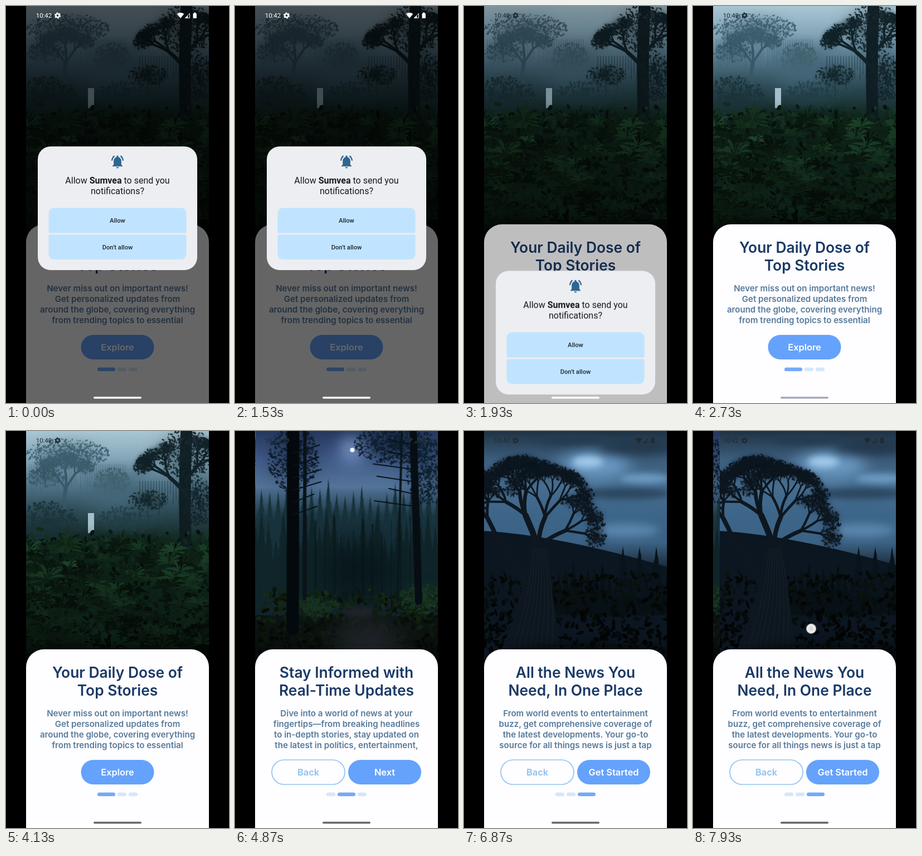
An HTML page with a canvas that plays this animation: 400 px wide and 711 px high, repeating every 8000 ms.

```html
<!DOCTYPE html>
<html lang="en">
<head>
<meta charset="utf-8">
<title>Onboarding</title>
<style>
  html, body { margin: 0; width: 100%; height: 100%; overflow: hidden; background: #000; }
  #stage { position: relative; width: 400px; height: 711px; overflow: hidden; }
  #view { position: absolute; left: 36px; top: 0; width: 328px; height: 430px; overflow: hidden; }
  #rail { display: flex; width: 984px; }
  svg { position: absolute; left: 0; top: 0; }
  text { text-anchor: middle; }
  .title { font: 600 26.4px Inter, sans-serif; fill: #1a3a66; }
  .body { font: 600 15.1px Inter, sans-serif; fill: #557a9c; }
  .label { font: 600 16.4px Inter, sans-serif; fill: #fff; }
  .ask { font: 400 16px Roboto, sans-serif; fill: #16191d; }
  .ask tspan { font-weight: 700; }
  .option { font: 500 11.2px Roboto, sans-serif; fill: #1d2630; }
  .clock { font: 400 11.4px Roboto, sans-serif; }
</style>
</head>
<body>
<div id="stage">
  <div id="view"><div id="rail"></div></div>
  <svg width="400" height="711">
    <defs>
      <radialGradient id="tip">
        <stop offset="0" stop-color="#d4d4d4"/>
        <stop offset=".8" stop-color="#f2f2f2"/>
        <stop offset="1" stop-color="#8a8a8a" stop-opacity=".5"/>
      </radialGradient>
      <clipPath id="options"><rect x="76.500" y="361.500" width="247" height="92.500" rx="9.500"/></clipPath>
    </defs>

    <path d="M36 711V423A32 32 0 0 1 68 391H332A32 32 0 0 1 364 423V711Z" fill="#fefdff"/>
    <g id="pages"></g>
    <rect id="dim" x="36" width="328" height="711"/>

    <g id="status">
      <text class="clock" x="68" y="21">10:42</text>
      <g fill="none" stroke="currentColor">
        <circle cx="92.500" cy="17" r="3.100" stroke-width="2.400"/>
        <circle cx="92.500" cy="17" r="4.700" stroke-width="1.800" stroke-dasharray="2.600 2.320"/>
        <path d="M321.500 21.400L329.400 13.400V21.400Z"/>
      </g>
      <path d="M313 22L306.600 14.200A10.200 10.200 0 0 1 319.400 14.200ZM321 22L326 17V22Z"/>
      <rect x="335.500" y="13" width="6.400" height="9" rx="1"/>
      <rect x="337.200" y="11.600" width="3" height="2"/>
    </g>

    <g id="dialog">
      <rect x="57" y="251.500" width="286" height="221.500" rx="23" fill="#edeef1"/>
      <g transform="translate(200 279)" fill="#2e6690">
        <path d="M-6.800 5V-2A6.800 6.800 0 0 1 6.800 -2V5L9 7.200V8.300H-9V7.200Z"/>
        <circle cy="-9.500" r="1.700"/>
        <path d="M-2.200 9.400H2.200A2.200 2.200 0 0 1 -2.200 9.400Z"/>
        <path d="M-10 -2Q-9.500 -7.500 -5.500 -10.500M10 -2Q9.500 -7.500 5.500 -10.500" fill="none" stroke="#2e6690" stroke-width="2.200"/>
      </g>
      <text class="ask" x="200" y="318">Allow <tspan>Sumvea</tspan> to send you</text>
      <text class="ask" x="200" y="336.500">notifications?</text>
      <g clip-path="url(#options)" fill="#c0e4ff">
        <rect x="76" y="361" width="248" height="45.500" rx="2.500"/>
        <rect x="76" y="409.500" width="248" height="45" rx="2.500"/>
      </g>
      <text class="option" x="200" y="388">Allow</text>
      <text class="option" x="200" y="436">Don’t allow</text>
    </g>

    <rect id="handle" x="157" y="699.800" width="86" height="3.400" rx="1.700"/>
    <circle id="touch" r="9.500" fill="url(#tip)"/>
  </svg>
</div>

<script>
const LOOP = 8000, FPS = 15, WIDTH = 328;
const $ = id => document.getElementById(id);

// ---- Onboarding pages ----
const pages = [
  { title: ['Your Daily Dose of', 'Top Stories'],
    body: ['Never miss out on important news!', 'Get personalized updates from',
      'around the globe, covering everything', 'from trending topics to essential'],
    next: 'Explore' },
  { title: ['Stay Informed with', 'Real-Time Updates'],
    body: ['Dive into a world of news at your', 'fingertips—from breaking headlines',
      'to in-depth stories, stay updated on', 'the latest in politics, entertainment,'],
    next: 'Next' },
  { title: ['All the News You', 'Need, In One Place'],
    body: ['From world events to entertainment', 'buzz, get comprehensive coverage of',
      'the latest developments. Your go-to', 'source for all things news is just a tap'],
    next: 'Get Started' }
];

const lines = (cls, rows, y, step) => rows.map((row, i) =>
  `<text class="${cls}" x="200" y="${y + i * step}">${row}</text>`).join('');

const button = (cx, label, hollow) =>
  `<rect x="${cx - 65.5}" y="589" width="131" height="44" rx="22" ${hollow
    ? 'fill="none" stroke="#90c3f3" stroke-width="1.7"' : 'fill="#64a2fc"'}/>
   <text class="label" x="${cx}" y="616.8" ${hollow ? 'style="fill:#8fc1ef"' : ''}>${label}</text>`;

const dots = active => pages.map((_, i) =>
  `<rect x="${164 + i * 20 + (i > active ? 16 : 0)}" y="647.5" width="${i === active ? 32 : 16}"
    height="6.4" rx="3.2" fill="${i === active ? '#72aafb' : '#d5e7f7'}"/>`).join('');

$('pages').innerHTML = pages.map((p, i) => `<g id="page${i}">
  ${lines('title', p.title, 442, 32)}${lines('body', p.body, 510.5, 19.1)}
  ${i ? button(131.5, 'Back', true) + button(268.5, p.next) : button(200, p.next)}
  ${dots(i)}</g>`).join('');

// ---- Scenery ----
let seed = 7, ctx;
const rnd = (lo = 0, hi = 1) =>
  lo + (hi - lo) * (seed = (seed * 16807) % 2147483647) / 2147483647;

// Vertical gradient with one colour every 50 px.
function wash(...colors) {
  const g = ctx.createLinearGradient(0, 0, 0, 400);
  colors.forEach((color, i) => g.addColorStop(i / (colors.length - 1), color));
  ctx.fillStyle = g;
  ctx.fillRect(-50, 0, 500, 430);
}

function oval(color, x, y, rx, ry, turn = 0) {
  ctx.fillStyle = color;
  ctx.beginPath();
  ctx.ellipse(x, y, rx, ry, turn, 0, 7);
  ctx.fill();
}

function glow(color, x, y, rx, ry, blur = ry * .6) {
  ctx.filter = `blur(${blur}px)`;
  oval(color, x, y, rx, ry);
  ctx.filter = 'none';
}

function limb(color, w, x1, y1, x2, y2, bend = 0) {
  ctx.strokeStyle = color;
  ctx.lineWidth = w;
  ctx.lineCap = 'round';
  ctx.beginPath();
  ctx.moveTo(x1, y1);
  ctx.quadraticCurveTo((x1 + x2) / 2 + bend, (y1 + y2) / 2, x2, y2);
  ctx.stroke();
}

// Soft crown with fine leaves, denser towards its middle.
function crown(color, x, y, rx, ry) {
  glow(color + '90', x, y, rx * .75, ry * .7);
  for (let i = 0; i < rx * ry / 5; i++) {
    const a = rnd(0, 6.28), d = rnd() ** .65, s = rnd(1.5, 3.5);
    oval(color + 'd0', x + Math.cos(a) * rx * d, y + Math.sin(a) * ry * d, s, s * .5, rnd(0, 3));
  }
}

function tree(color, x, y, angle, len, width, depth) {
  const ex = x + Math.cos(angle) * len, ey = y + Math.sin(angle) * len;
  limb(color, width, x, y, ex, ey, rnd(-.15, .15) * len);
  if (!depth) return crown(color, ex, ey, len * .7, len * .5);
  for (const turn of [-.5, 0, .5])
    tree(color, ex, ey, angle + turn + rnd(-.2, .2), len * .74, width * .6, depth - 1);
}

function pine(color, x, top, base, half) {
  ctx.fillStyle = color;
  for (const side of [-1, 1]) {
    ctx.beginPath();
    ctx.moveTo(x, top);
    for (let y = top + 4; y < base; y += 6) {
      const w = side * half * (y - top) / (base - top);
      ctx.lineTo(x + w * rnd(.8, 1.3), y + 4);
      ctx.lineTo(x + w * .6, y);
    }
    ctx.lineTo(x, base);
    ctx.fill();
  }
}

// Scattered dabs that darken towards the bottom.
function scrub(n, hue, sat, light, top, draw) {
  for (let i = 0; i < n; i++) {
    const y = top + (400 - top) * i / n, l = light * rnd(.25, 1) * (1.1 - .7 * i / n);
    draw(`hsl(${hue} ${sat}% ${l}%)`, rnd(0, 370), y + rnd(-8, 8));
  }
}
const dab = (color, x, y) => oval(color, x, y, rnd(3, 8), rnd(1.5, 4), rnd(0, 3));

// Fan of narrow arching blades.
function fern(color, x, y) {
  const len = rnd(14, 38), n = 8;
  for (let i = 0; i <= n; i++) {
    const a = -Math.PI * (i / n + rnd(-.04, .04)), l = len * rnd(.6, 1.1);
    const dx = Math.cos(a) * l, dy = Math.sin(a) * l * .75;
    ctx.fillStyle = color;
    ctx.beginPath();
    ctx.moveTo(x, y);
    ctx.quadraticCurveTo(x + dx * .5 + 2, y + dy - 3, x + dx, y + dy + Math.abs(dx) * .2);
    ctx.quadraticCurveTo(x + dx * .5 - 2, y + dy * .6 + 2, x, y);
    ctx.fill();
  }
}

function jungle() {
  wash('#a9c6d4', '#86a8ba', '#507386', '#2a4751', '#10261f', '#0b1d16', '#08160f', '#06100b', '#030706');
  glow('#45687a', 205, 115, 50, 35);
  crown('#42636f', 190, 92, 34, 26);
  tree('#3a5a69', 107, 145, -1.57, 42, 7, 2);
  crown('#3f606f', 110, 42, 76, 28);
  crown('#385765', 70, 82, 36, 18);
  for (let x = 42; x < 215; x += 4) limb('#3a5a6970', 1, x, 60, x, rnd(75, 115));
  crown('#1b343a', 75, 165, 55, 40);
  crown('#223e47', 215, 160, 50, 26);
  ctx.fillStyle = '#a3bfcc';
  ctx.fillRect(147, 147, 11, 36);
  limb('#0f1d22', 21, 324, -5, 322, 200, -4);
  tree('#12232a', 322, 115, -2.3, 42, 7, 2);
  tree('#12232a', 322, 90, -.9, 35, 6, 2);
  crown('#12242a', 322, 40, 50, 45);
  crown('#14272c', 255, 124, 36, 18);
  crown('#12242a', 345, 125, 28, 45);
  for (let x = 240; x < 364; x += 5) limb('#12242aa0', 1, x, 90, x, rnd(110, 165));
  glow('#0c2118', 200, 290, 210, 100, 12);
  scrub(900, 145, 38, 14, 182, dab);
  scrub(190, 140, 40, 19, 205, fern);
  glow('#030706', 200, 405, 200, 14);
}

function forest() {
  ctx.translate(42, 0);
  wash('#26395f', '#425c8a', '#54749a', '#1e3b46', '#12292e', '#0c1e21', '#0a1719', '#0c1412', '#080c0c');
  glow('#7590be', 168, 34, 22, 22);
  oval('#f5f8ff', 168, 34, 4, 4);
  for (let x = -10; x < 345; x += 15) pine('#18323c', x, rnd(82, 125), 320, 28);
  for (let x = -8; x < 345; x += 13) pine('#102529', x, rnd(130, 200), 330, 26);
  glow('#08161a', 180, 250, 75, 50);
  for (let x = 85; x < 300; x += 17) limb('#081517a0', rnd(1, 4), x, rnd(150, 190), x, 305);
  scrub(700, 115, 32, 13, 290, dab);
  glow('#20242b', 180, 325, 28, 10);
  glow('#1f2329', 195, 375, 65, 38);
  crown('#1c3a22', 292, 300, 38, 28);
  crown('#1a3522', 100, 315, 45, 20);
  crown('#0d1d2d', 245, 25, 75, 34);
  crown('#0e202e', 305, 75, 40, 60);
  crown('#0c1a28', 62, 50, 45, 60);
  limb('#04090d', 22, 62, -5, 61, 355);
  limb('#08131a', 6, 83, -5, 82, 300);
  limb('#060d13', 13, 277, -5, 287, 305);
  limb('#0a171c', 4, 257, 0, 249, 305);
  for (let y = 25; y < 140; y += 22) {
    limb('#08131b', 2, 62, y + 15, rnd(95, 115), y);
    limb('#08131b', 2, 280, y, rnd(205, 235), y - 10);
  }
}

function dusk() {
  wash('#1f3243', '#3c5d7b', '#466d8f', '#3d6589', '#3b6284', '#14222e', '#0a1214', '#060b0c', '#030606');
  glow('#6d9cc6', 235, 62, 65, 24);
  glow('#a0c9ea', 222, 55, 28, 10);
  glow('#22384c', 310, 28, 70, 15);
  glow('#253b50', 195, 15, 65, 10);
  glow('#2b465f', 290, 112, 80, 10);
  glow('#6c9ac2', 325, 85, 45, 9);
  glow('#5b86ad', 290, 178, 60, 12);
  ctx.fillStyle = '#0b1621';
  ctx.beginPath();
  ctx.moveTo(0, 178);
  ctx.quadraticCurveTo(140, 178, 370, 245);
  ctx.lineTo(370, 430);
  ctx.lineTo(0, 430);
  ctx.fill();
  for (let x = 170; x < 375; x += 13) pine('#071015', x, rnd(232, 260), 330, 16);
  for (let x = 285; x < 364; x += 30) pine('#09131b', x, 206, 300, 18);
  scrub(600, 160, 30, 6, 255, dab);
  const bark = '#0e1720';
  for (let i = 0; i < 9; i++) limb(bark, 12, 122 + i * 3, 200, 72 + i * 12, 395, 18 - i * 3);
  limb(bark, 15, 118, 285, 60, 190, 2);
  tree(bark, 60, 195, -2, 42, 8, 2);
  tree(bark, 132, 205, -1.95, 58, 11, 3);
  tree(bark, 134, 205, -1.35, 52, 8, 3);
  tree(bark, 142, 200, -.5, 45, 7, 2);
  for (let i = 0; i < 8; i++) limb('#1b2731a0', 1.2, 124 + i * 3, 210, 88 + i * 10, 385, 12);
  glow('#030606', 230, 400, 160, 16);
}

for (const scene of [jungle, forest, dusk]) {
  const c = document.createElement('canvas');
  c.width = WIDTH;
  c.height = 430;
  ctx = c.getContext('2d');
  ctx.translate(-36, 0);
  scene();
  $('rail').append(c);
}

// ---- Timeline: [ms, value, easing towards the next step] ----
function play(id, prop, steps) {
  const frames = steps.map(([ms, value, easing = 'step-end']) =>
    ({ offset: ms / LOOP, [prop]: value, easing }));
  frames.push({ offset: 1, [prop]: frames[frames.length - 1][prop] });
  $(id).animate(frames, {
    duration: LOOP, iterations: Infinity, delay: -4, easing: `steps(${LOOP / 1000 * FPS}, end)`
  });
}
const at = (x, y = 0) => `translate(${x}px, ${y}px)`;

play('dialog', 'transform', [[0, at(0)], [1660, at(0), 'cubic-bezier(.4, 0, 1, 1)'], [2090, at(0, 462)]]);
play('dim', 'opacity', [[0, .6], [1660, .6, 'linear'], [2130, 0]]);
for (const prop of ['fill', 'color']) play('status', prop, [[0, '#fff'], [1930, '#202a32']]);
play('handle', 'fill', [
  [0, '#fff'], [2130, '#fff', 'linear'], [2730, '#a4acb7', 'linear'], [3730, '#68656b']]);

// Each slide swaps the panel text once the next picture passes the middle.
const slides = [4200, 6050], swap = slides.map(ms => ms + 200);
play('rail', 'transform', [
  [0, at(0)],
  ...slides.flatMap((ms, i) => [[ms, at(-WIDTH * i), 'ease'], [ms + 700, at(-WIDTH * (i + 1))]]),
  [7860, at(-2 * WIDTH), 'linear'], [7933, at(12 - 2 * WIDTH)]]);
pages.forEach((_, i) => {
  const steps = [[0, i ? 0 : 1]];
  if (i) steps.push([swap[i - 1], 1]);
  if (swap[i]) steps.push([swap[i], 0]);
  play('page' + i, 'opacity', steps);
});

// Taps fade out after release; the last touch is a drag.
const taps = [[1325, 212, 388], [3860, 250, 622], [5995, 265, 618]];
play('touch', 'transform', [
  [0, at(0)], ...taps.map(([ms, x, y]) => [ms, at(x, y)]),
  [7795, at(200, 355), 'linear'], [7933, at(212, 354)]]);
play('touch', 'opacity', [
  [0, 0], ...taps.flatMap(([ms]) => [[ms, .7], [ms + 130, .45], [ms + 200, 0]]), [7795, 1]]);
</script>
</body>
</html>
```
